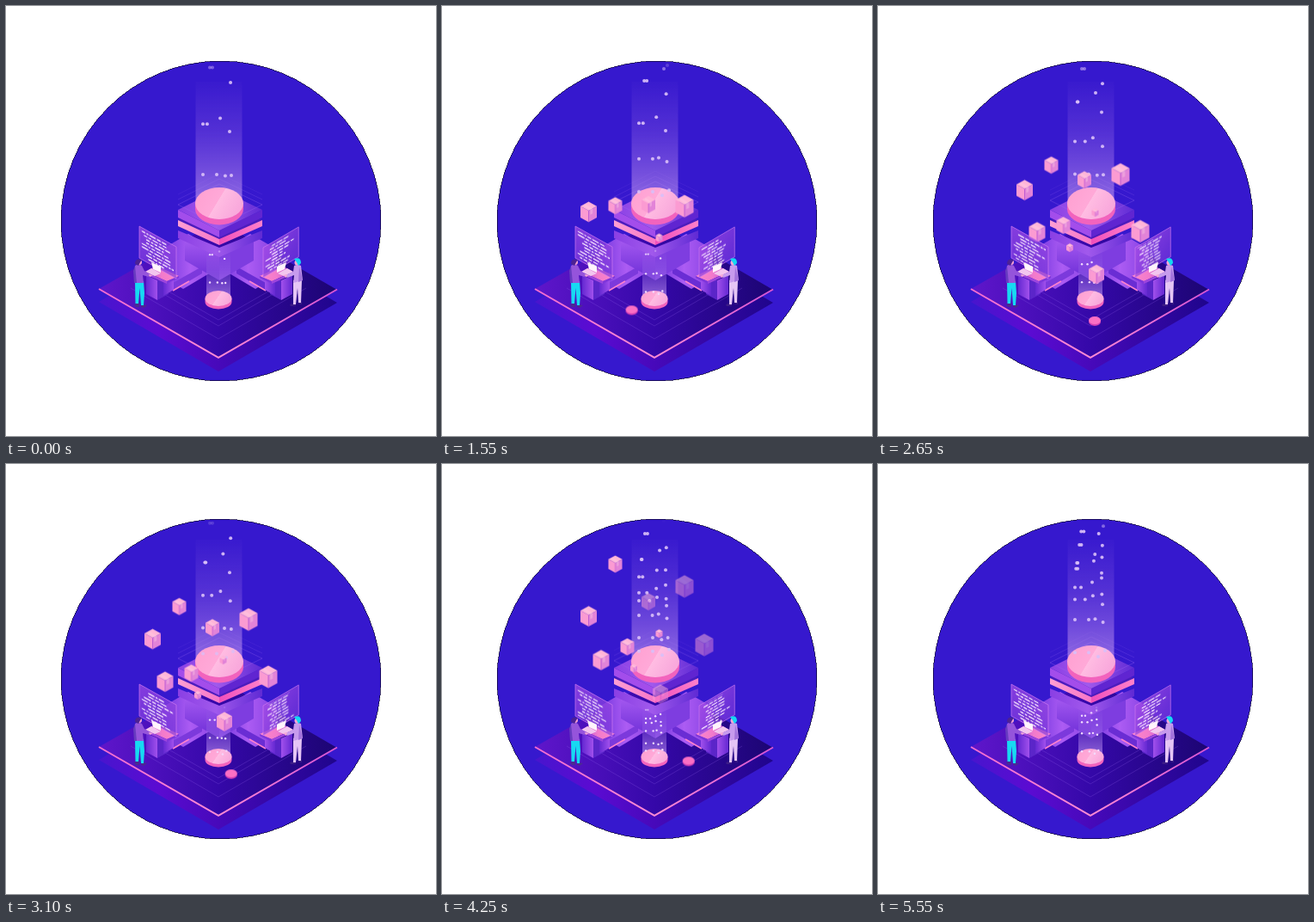
These frames come from a looping animation (500x500 px, 5600 ms). An HTML page:

```html
<!DOCTYPE html>
<html lang="en">
<head>
<meta charset="utf-8">
<title>Isometric lab</title>
<style>
html, body { margin: 0; width: 100%; height: 100%; overflow: hidden; background: #fff; }
svg { display: block; width: 100vw; height: 100vh; }
.cube { animation: rise 5600ms linear infinite, var(--fade) 5600ms linear infinite; }
.puck { animation: slide 5600ms linear infinite; }
.code { animation: scroll 5600ms linear infinite; }
.frame { animation: hover 2800ms ease-in-out infinite alternate; }
@keyframes rise {
  from { transform: translate(var(--x), var(--y0)); }
  to { transform: translate(var(--x), var(--y1)); }
}
@keyframes early-left { 0%, 5% { opacity: 0; } 11%, 83% { opacity: 1; } 98%, 100% { opacity: 0; } }
@keyframes early-right { 0%, 5% { opacity: 0; } 11%, 68% { opacity: 1; } 84%, 100% { opacity: 0; } }
@keyframes late-left { 0%, 32% { opacity: 0; } 42%, 83% { opacity: 1; } 98%, 100% { opacity: 0; } }
@keyframes late-right { 0%, 32% { opacity: 0; } 42%, 68% { opacity: 1; } 84%, 100% { opacity: 0; } }
@keyframes slide {
  0% { transform: translate(173.5px, 325.5px); opacity: 0; }
  6% { opacity: 0; }
  11% { opacity: 1; }
  43.2% { transform: translate(247px, 369px); }
  90% { opacity: 1; }
  95% { opacity: 0; }
  100% { transform: translate(316px, 328px); opacity: 0; }
}
@keyframes scroll { to { transform: translateY(-50.4px); } }
@keyframes hover { to { transform: translateY(-5px); } }
</style>
</head>
<body>
<svg viewBox="0 0 500 500">
  <defs>
    <linearGradient id="floor"><stop stop-color="#5f16cb"/><stop offset=".5" stop-color="#3508a9"/><stop offset="1" stop-color="#1c0573"/></linearGradient>
    <linearGradient id="under"><stop stop-color="#4815ce"/><stop offset=".25" stop-color="#5b0bd2"/><stop offset="1" stop-color="#1f058c"/></linearGradient>
    <linearGradient id="edge"><stop stop-color="#f36bd0"/><stop offset=".5" stop-color="#ff8bd4"/><stop offset="1" stop-color="#d754d4"/></linearGradient>
    <linearGradient id="leg"><stop stop-color="#6f33dc"/><stop offset=".5" stop-color="#ac5cf3"/><stop offset="1" stop-color="#8540e2"/></linearGradient>
    <linearGradient id="slab"><stop stop-color="#8a3fe4"/><stop offset=".45" stop-color="#a159ec"/><stop offset="1" stop-color="#5f2ad4"/></linearGradient>
    <linearGradient id="pinkL"><stop stop-color="#ff9fd2"/><stop offset="1" stop-color="#f775c8"/></linearGradient>
    <linearGradient id="pinkR"><stop stop-color="#f04fbc"/><stop offset="1" stop-color="#ff80ca"/></linearGradient>
    <linearGradient id="body" x2="0" y2="1"><stop stop-color="#a95cf2"/><stop offset="1" stop-color="#6a2cd6"/></linearGradient>
    <linearGradient id="beam" x2="0" y2="1"><stop stop-color="#a070e8" stop-opacity=".03"/><stop offset=".4" stop-color="#a070e8" stop-opacity=".27"/><stop offset="1" stop-color="#bd93ee" stop-opacity=".68"/></linearGradient>
    <linearGradient id="disk" y2=".4"><stop stop-color="#ff9fd0"/><stop offset=".55" stop-color="#ffa9d8"/><stop offset=".56" stop-color="#ffbce2"/><stop offset="1" stop-color="#f9a9dc"/></linearGradient>
    <linearGradient id="glass" y2="1"><stop stop-color="#a24ae4" stop-opacity=".75"/><stop offset="1" stop-color="#7a38da" stop-opacity=".65"/></linearGradient>
    <linearGradient id="box"><stop stop-color="#6428d2"/><stop offset="1" stop-color="#a150ec"/></linearGradient>
    <linearGradient id="desktop"><stop stop-color="#b04fe0"/><stop offset=".5" stop-color="#f27acb"/><stop offset="1" stop-color="#ff86c8"/></linearGradient>
    <clipPath id="round"><circle cx="250" cy="250" r="186"/></clipPath>
    <clipPath id="screen"><path d="M2 3H40V35H2Z"/></clipPath>
    <g id="cube">
      <path d="M0-12.5 10-7 0-1.5-10-7Z" fill="#ffb5d8"/>
      <path d="M-10-7 0-1.5V12.5L-10 7Z" fill="#fb9bd2"/>
      <path d="M10-7 0-1.5V12.5L10 7Z" fill="#e283d8"/>
      <path d="M-4-9.5 5-4V2L2 3.5V-2L-6-7Z" fill="#ffcde6" opacity=".4"/>
      <path d="M0-1.5V12.5" stroke="#c05bd2" stroke-width=".8"/>
    </g>
    <g id="desk">
      <path d="M163 313 176 319V342L163 335Z" fill="url(#box)"/>
      <path d="M176 319 189 312V335L176 342Z" fill="#5b25c9"/>
      <path d="M183 316 195 309V330L183 337Z" fill="url(#box)"/>
      <path d="M162 309 175 302 201 314 187 320Z" fill="url(#desktop)"/>
      <path d="M162 309 187 320V323L162 312Z" fill="#9d45dd"/>
      <path d="M187 320 201 314V316L187 323Z" fill="#7f36db"/>
      <path d="M162 309 169 305 180 311 173 314Z" fill="#f3c5ee"/>
    </g>
  </defs>

  <circle cx="250" cy="250" r="186" fill="#3618ce" stroke="#0a0433" stroke-width=".7" shape-rendering="crispEdges"/>
  <g clip-path="url(#round)">
    <path d="M108 344 247 264 385 345 247 425Z" fill="url(#under)"/>
    <path d="M108 329 247 250 385 330 247 409Z" fill="url(#floor)"/>
    <path d="M108 329 247 408.800 385 329.500" fill="none" stroke="url(#edge)" stroke-width="2"/>
    <g fill="none" stroke="#9a6bf0" stroke-width=".6" opacity=".4">
      <path d="M145 328 247 387 349 328"/>
      <path d="M168 326 247 372 326 326"/>
      <path d="M177 325 247 365 317 325"/>
    </g>

    <g class="puck">
      <ellipse cy="1" rx="7" ry="5" fill="#d43fb4"/>
      <ellipse cy="-.5" rx="7" ry="4.500" fill="#fb6fc4"/>
    </g>

    <!-- walkways -->
    <path d="M181 283 212 265 248 286V304L206 329 181 314Z" fill="url(#leg)"/>
    <path d="M315 283 284 265 248 286V304L290 329 315 314Z" fill="url(#leg)"/>
    <path d="M194 322 228 303V311L194 331Z" fill="#7c39dc"/>
    <path d="M302 322 268 303V311L302 331Z" fill="#6a2dd4"/>
    <path d="M194 331 213 320M302 331 283 320" stroke="#ff80cd" stroke-width="1.600"/>

    <!-- tower -->
    <path d="M208 268 248 287V319L208 296Z" fill="url(#body)"/>
    <path d="M288 268 248 287V319L288 296Z" fill="#7e3de0"/>
    <path d="M200 261 248 281 298 261V270L248 292 200 270Z" fill="url(#slab)"/>
    <path d="M200 249 248 227 298 249 248 271Z" fill="#4c1cbd"/>
    <path d="M200 249 248 271V278L200 256Z" fill="url(#pinkL)"/>
    <path d="M298 249 248 271V278L298 256Z" fill="url(#pinkR)"/>
    <path d="M200 237 248 261V269L200 246Z" fill="#a34deb"/>
    <path d="M298 237 248 261V269L298 246Z" fill="#6025d1"/>
    <path d="M200 237 248 213 298 237 248 261Z" fill="url(#slab)"/>
    <g class="frame" fill="none" stroke="#a070f5" stroke-width=".6">
      <path d="M200 231 248 207 298 231 248 255Z" opacity=".5"/>
      <path d="M200 225 248 201 298 225" opacity=".35"/>
      <path d="M200 219 248 195 298 219" opacity=".2"/>
    </g>

    <!-- light and disks -->
    <path d="M220.500 88H274.500V230H220.500Z" fill="url(#beam)"/>
    <path d="M220 229V236A28 18.500 0 0 0 276 236V229Z" fill="#f263bd"/>
    <ellipse cx="248" cy="229.500" rx="28" ry="18.500" fill="url(#disk)"/>
    <path d="M233 284 247 292 261 284V340H233Z" fill="url(#beam)"/>
    <path d="M231.500 340V344A15.500 8.500 0 0 0 262.500 344V340Z" fill="#f263bd"/>
    <ellipse cx="247" cy="340" rx="15.500" ry="9" fill="url(#disk)"/>

    <g id="dots" fill="#d9bff7"></g>
    <g id="cubes"></g>

    <use href="#desk"/>
    <use href="#desk" transform="matrix(-1 0 0 1 496 0)"/>
    <g id="screens"></g>
    <g fill="#fff3fb">
      <path d="M169 298 180 303V310L171 306Z"/>
      <path d="M326 298 315 303V310L324 306Z"/>
    </g>

    <!-- workers -->
    <g>
      <path d="M149 347 155 345 155 350 151 350ZM157 347 164 348 160 351 157 350Z" fill="#4b2a91"/>
      <path d="M150 320H160L161 334 160 348H157L155.500 328 154 346H150.500Z" fill="#17d9f2"/>
      <path d="M150 302Q154 299 158 302L161 308 168 312 166 315 159 313 160 322H150Z" fill="#9554db"/>
      <path d="M150 302 152 322H149L148 308Z" fill="#673bc0"/>
      <path d="M166 312 171 313 167 315Z" fill="#f6aad6"/>
      <circle cx="155" cy="298" r="3" fill="#f49fcf"/>
      <path d="M150 300Q150 293 158 295L156 298 154 302Z" fill="#4c2195"/>
    </g>
    <g>
      <path d="M330 347 337 345V349H331ZM339 346 344 344V347Z" fill="#3c1d87"/>
      <path d="M334 319H344L343 345H340L339 328 337 347H334Z" fill="#e5c5f5"/>
      <path d="M335 302Q339 300 343 302L345 319 334 322 335 313 327 316 325 313 334 309Z" fill="#c79bed"/>
      <path d="M341 303 345 319 340 321Z" fill="#a272db"/>
      <path d="M322 313 327 312 326 316Z" fill="#f6aad6"/>
      <circle cx="338.500" cy="298.500" r="3" fill="#f7a9d2"/>
      <path d="M335 294Q343 291 343 299L340 302 338 298Z" fill="#13d8f3"/>
    </g>
  </g>
</svg>
<script>
const LOOP = 5600;
const NS = "http://www.w3.org/2000/svg";
const byId = id => document.getElementById(id);

function add(parent, tag, attrs) {
  const el = document.createElementNS(NS, tag);
  for (const key in attrs) el.setAttribute(key, attrs[key]);
  return parent.appendChild(el);
}

// x, y at 2650 ms, px per ms, width, fade
const cubes = [
  [170.5, 214, .0231, 19, "early-left"],
  [201.5, 185, .0429, 16, "early-left"],
  [240, 202, .0262, 16, "early-right"],
  [282, 196, .0335, 21, "early-right"],
  [252.5, 240, .0268, 8, "early-left"],
  [185, 263, .0219, 19, "late-left"],
  [215.5, 255, .0265, 16, "late-left"],
  [305, 262, .0322, 21, "late-right"],
  [254, 312, .0278, 18, "late-right"],
  [223, 281, .0272, 8, "late-left"]
];
for (const [x, y, speed, width, fade] of cubes) {
  const el = add(byId("cubes"), "g", { class: "cube" });
  el.style.setProperty("--x", x + "px");
  el.style.setProperty("--y0", y + 2650 * speed + "px");
  el.style.setProperty("--y1", y - (LOOP - 2650) * speed + "px");
  el.style.setProperty("--fade", fade);
  add(el, "use", { href: "#cube", transform: `scale(${width / 20})` });
}

// Code panels
let seed = 11;
const random = () => (seed = seed * 16807 % 2147483647) / 2147483647;

function addScreen(matrix) {
  const panel = add(byId("screens"), "g", { transform: matrix });
  add(panel, "path", { d: "M0 0H43V37H0Z", fill: "url(#glass)", stroke: "#d07cf0", "stroke-width": .6 });
  const view = add(panel, "g", { "clip-path": "url(#screen)" });
  const code = add(view, "g", { class: "code" });
  let d = "";
  for (let row = 0; row < 14; row++) {
    let x = 3 + Math.floor(random() * 4) * 2.5;
    const end = 22 + random() * 16;
    while (x < end) {
      const len = 2 + random() * 6;
      for (const copy of [0, 14]) d += `M${x} ${4 + (row + copy) * 3.6}h${len}`;
      x += len + 1.4;
    }
  }
  add(code, "path", { d, stroke: "#fff0ff", "stroke-width": 1.4 });
}
addScreen("matrix(1 .56 0 1 155 256)");
addScreen("matrix(.96 -.56 0 .94 299 281)");

// Each track: start height, speed, then [y, x] bends from top to bottom
const tracks = [
  [225, .0951, [[73, 237], [88, 235], [110, 232], [130, 229], [230, 229]]],
  [225, .0951, [[73, 240], [88, 238], [110, 232.5], [121, 232], [138, 234], [149, 238], [158, 241], [178, 245], [230, 245]]],
  [230.5, .1085, [[74, 258], [101, 253], [112, 251], [131, 249], [143, 249], [155, 250], [177, 252], [198, 255], [220, 256]]],
  [222, .0825, [[72, 262], [90, 261], [123, 260], [146, 260], [163, 261], [197, 262], [214, 264]]]
];
const waves = [-1612, -921, -303, 100, 618, 1053, 1457, 1940, 2340, 2738, 3053,
  3265, 3460, 3556, 3735, 4010, 4174, 4395, 4465, 4695, 4840, 5089, 5490];

function bend(points, y) {
  if (y <= points[0][0]) return points[0][1];
  for (let i = 1; i < points.length; i++) {
    const [y0, x0] = points[i - 1], [y1, x1] = points[i];
    if (y <= y1) return x0 + (x1 - x0) * (y - y0) / (y1 - y0);
  }
  return points[points.length - 1][1];
}

const clamp = v => Math.max(0, Math.min(1, v));
const dots = waves.flatMap(born => tracks.map(track => ({
  born, track,
  high: add(byId("dots"), "circle", { r: 2 }),
  low: add(byId("dots"), "circle", { r: 1.2, fill: "#f3dcff" })
})));

function place(el, x, y, opacity) {
  el.setAttribute("cx", x);
  el.setAttribute("cy", y);
  el.setAttribute("opacity", opacity);
}

function draw(t) {
  for (const { born, track: [start, speed, points], high, low } of dots) {
    const age = t - born;
    const y = start - speed * age;
    const x = bend(points, y);
    const shown = age < 0 ? 0 : clamp(age / 60);
    place(high, x, y, shown * clamp((y - 66) / 12) * .92);
    const lowY = 322 + (y - 197) * .55;
    place(low, 247.5 + (x - 248) * .55, lowY, shown * clamp((lowY - 282) / 8));
  }
}

function tick() {
  draw(performance.now() % LOOP);
  requestAnimationFrame(tick);
}
tick();
</script>
</body>
</html>
```
